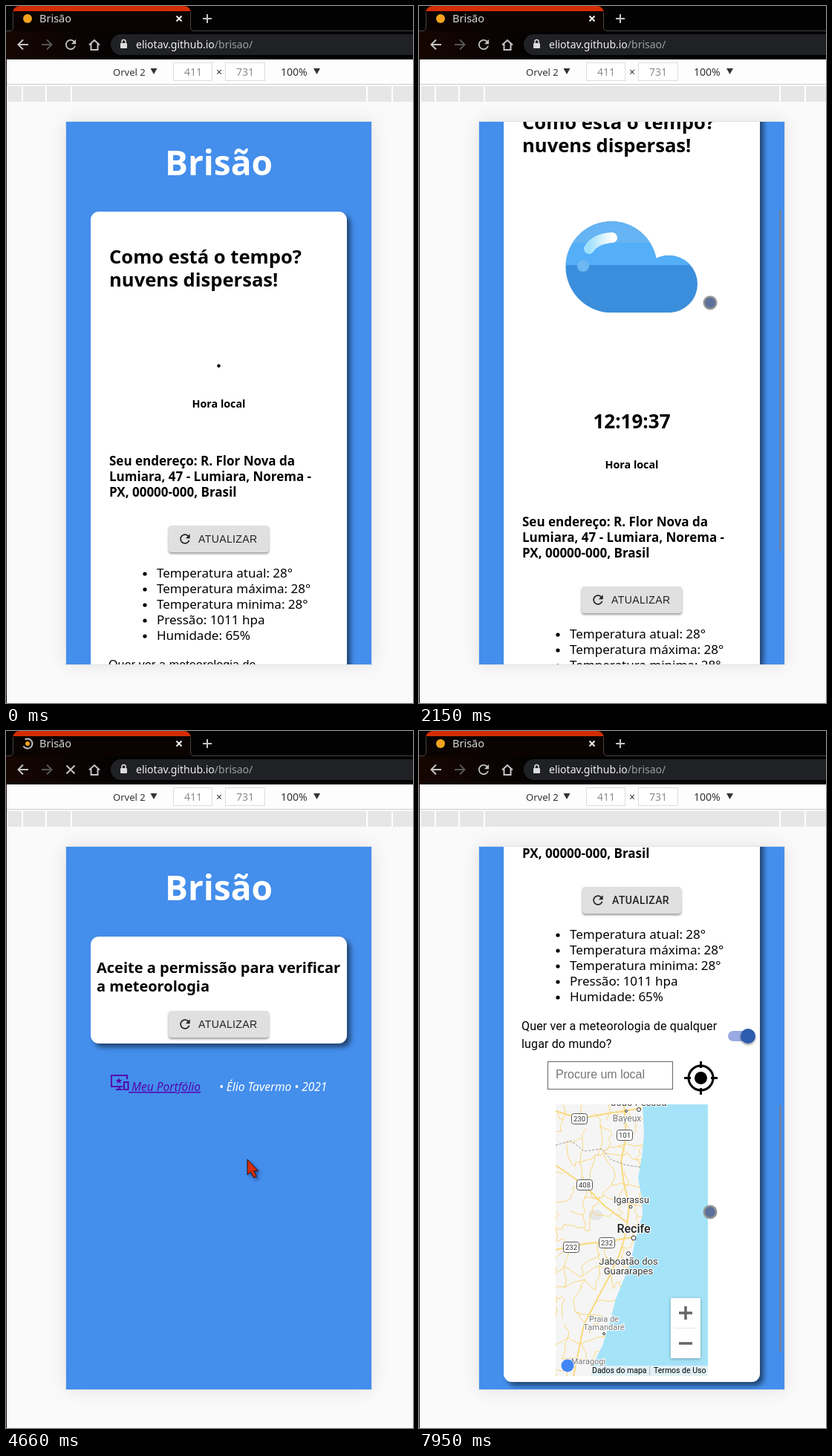
Animation of 548x939 px, one loop 8000 ms. Source, as an HTML page:

```html
<!DOCTYPE html>
<html lang="pt">
<head>
<meta charset="utf-8">
<title>Brisão</title>
<style>
  html, body { margin: 0; width: 100%; height: 100%; overflow: hidden; background: #fafafa; }
  svg { display: block; font-family: "Noto Sans", sans-serif; }
  text { white-space: pre; }
  .bold { font-weight: 700; }
  .mid { text-anchor: middle; }
  .arial { font-family: "Liberation Sans", sans-serif; }
  .roboto { font-family: Roboto, sans-serif; }
  .card { fill: #fff; filter: drop-shadow(5px 5px 3px rgba(0, 0, 0, .5)); }
  .raised { filter: drop-shadow(0 2px 1.5px rgba(0, 0, 0, .4)); }
  .line { fill: none; stroke: #c4c4c4; stroke-width: 2; }
</style>
</head>
<body>
<svg width="548" height="939" viewBox="0 0 548 939">
  <defs>
    <path id="refresh" d="M17.65 6.35C16.2 4.9 14.21 4 12 4c-4.42 0-8 3.58-8 8s3.58 8 8 8c3.73 0 6.84-2.55 7.73-6h-2.08c-.82 2.33-3.04 4-5.65 4-3.31 0-6-2.69-6-6s2.69-6 6-6c1.66 0 3.14.69 4.22 1.78L13 11h7V4z"/>
    <linearGradient id="bar"><stop stop-color="#160602"/><stop offset=".3" stop-color="#020202"/></linearGradient>
    <linearGradient id="shine"><stop stop-color="#9fe0fb"/><stop offset="1" stop-color="#fff"/></linearGradient>
    <clipPath id="tabShape"><rect x="9" width="240" height="50" rx="9"/></clipPath>
    <clipPath id="cloudShape">
      <circle cx="259" cy="544.5" r="61.5"/><circle cx="336.5" cy="567.5" r="38.5"/>
      <rect x="259" y="567" width="78" height="39"/>
    </clipPath>
    <clipPath id="mapShape"><rect x="184" y="503" width="205" height="366"/></clipPath>
  </defs>

  <!-- browser bar -->
  <rect width="548" height="72" fill="#020202"/>
  <rect y="33" width="548" height="39" fill="url(#bar)"/>
  <g clip-path="url(#tabShape)">
    <rect x="9" width="240" height="34" fill="#0a0302"/>
    <rect x="9" width="240" height="7" fill="#d42d03"/>
  </g>
  <path d="M0 33.500H5Q9.500 33.500 9.500 28V8M248.500 8V28Q248.500 33.500 253 33.500H548" fill="none" stroke="#4a4342"/>
  <circle id="favicon" cx="29" cy="17" r="6" fill="#f2a31f"/>
  <circle id="spinner" cx="29" cy="17" r="6.500" class="line" stroke-dasharray="30 11"/>
  <text x="45" y="22" font-size="14.500" fill="#d8d8d8">Brisão</text>
  <path d="M229.500 13.500l7 7m0-7l-7 7" class="line" style="stroke:#eee"/>
  <path d="M265 17h12m-6-6v12" class="line"/>
  <path d="M30 52H17m6-6.500L16.500 52l6.500 6.500" class="line"/>
  <path d="M48 52h13m-6-6.500L61.500 52 55 58.500" class="line" style="stroke:#555"/>
  <use id="reload" href="#refresh" transform="translate(76.500 41.500) scale(.88)" fill="#c4c4c4"/>
  <path id="stop" d="M81.500 46.500l11 11m0-11l-11 11" class="line"/>
  <path d="M112 52.500l7-6.500 7 6.500m-11.500-1.500v8h9v-8" class="line"/>
  <rect x="141" y="38" width="430" height="28" rx="14" fill="#202124"/>
  <rect x="154" y="50" width="9" height="7" rx="1" fill="#ddd"/>
  <path d="M156 50v-2a2.500 2.500 0 0 1 5 0v2" class="line" style="stroke:#ddd;stroke-width:1.5"/>
  <text x="175" y="57" font-size="14" fill="#f0f0f0">eliotav.github.io<tspan fill="#9aa0a6">/brisao/</tspan></text>

  <!-- device bar -->
  <rect y="72" width="548" height="33" fill="#fdfdfd"/>
  <path d="M0 105.500H548" stroke="#ccc"/>
  <g font-size="14" fill="#333">
    <text x="144" y="94" font-size="13">Orvel 2</text><path d="M194.500 84h9l-4.500 8z"/>
    <text x="370" y="94">100%</text><path d="M414 84h9l-4.500 8z"/>
    <text x="287" y="94" class="mid">×</text>
    <g fill="#fff" stroke="#ddd"><rect x="225.500" y="76.500" width="52" height="24"/><rect x="295.500" y="76.500" width="53" height="24"/></g>
    <text x="252" y="94" class="mid" fill="#8c8c8c">411</text><text x="322" y="94" class="mid" fill="#8c8c8c">731</text>
  </g>
  <rect x="3" y="108" width="545" height="21" fill="#e6e6e6"/>
  <path d="M22 108v21M54 108v21M88 108v21M486 108v21M520 108v21" stroke="#fff" stroke-width="2"/>
  <path d="M.5 72V939" stroke="#1a0a08"/>
  <rect x="81" y="156" width="411" height="731" fill="#448eec" style="filter:drop-shadow(0 0 12px rgba(0,0,0,.1))"/>
  <rect x="80.500" y="155.500" width="412" height="732" fill="none" stroke="#dde3ea"/>

  <svg x="81" y="156" width="411" height="731" viewBox="81 156 411 731">
    <rect x="81" y="156" width="411" height="731" fill="#448eec"/>
    <g id="page">
      <text x="286.500" y="228" class="bold mid" font-size="46" fill="#fff">Brisão</text>
      <rect id="card" class="card" x="114" y="277" width="345" height="144" rx="11"/>

      <g id="prompt" class="bold" font-size="20">
        <text x="122" y="326">Aceite a permissão para verificar</text><text x="122" y="351">a meteorologia</text>
      </g>

      <g id="weather">
        <g class="bold" font-size="25.600">
          <text x="139" y="347">Como está o tempo?</text><text x="139" y="378">nuvens dispersas!</text>
        </g>
        <g id="cloud">
          <g clip-path="url(#cloudShape)">
            <rect x="197" y="483" width="178" height="123" fill="#3a8edb"/>
            <rect x="197" y="483" width="178" height="59" fill="#54aef8"/>
            <rect x="197" y="483" width="178" height="29" fill="#66b4f3"/>
          </g>
          <path d="M229 520Q238 506 260 505" fill="none" stroke="url(#shine)" stroke-width="14" stroke-linecap="round"/>
          <circle cx="221" cy="543" r="8" fill="#6db8f2"/>
        </g>
        <g id="lower">
          <text id="clock" x="286.500" y="487" class="bold mid" font-size="26"></text>
          <text x="286.500" y="541" class="bold mid" font-size="14.300">Hora local</text>
          <g class="bold" font-size="17">
            <text x="139" y="619">Seu endereço: R. Flor Nova da</text>
            <text x="139" y="640">Lumiara, 47 - Lumiara, Norema -</text>
            <text x="139" y="661">PX, 00000-000, Brasil</text>
          </g>
          <g id="facts" font-size="17"></g>
          <g id="question" font-size="16"><text id="line1" x="138" y="893"></text><text id="line2" x="138" y="917"></text></g>
          <rect id="track" x="416" y="894" width="34" height="14" rx="7"/>
          <circle id="knob" cy="901" r="10" class="raised"/>

          <g id="search" transform="translate(0 490)">
            <rect x="173.500" y="445.500" width="168" height="37" fill="#fff" stroke="#666"/>
            <text x="184" y="468" class="arial" font-size="16" fill="#757575">Procure um local</text>
            <g stroke="#000" stroke-width="3"><circle cx="379.500" cy="467.500" r="16.500" fill="none"/><path d="M379.500 445v9m0 27v9M357 467.500h9m27 0h9"/></g>
            <circle cx="379.500" cy="467.500" r="8.500"/>
            <rect x="184" y="503" width="205" height="366" fill="#e5e3df"/>
            <g id="map" clip-path="url(#mapShape)">
              <rect x="184" y="503" width="205" height="366" fill="#f5f5f5"/>
              <ellipse cx="238" cy="652" rx="10" ry="7" fill="#e6e6e6"/>
              <g id="roads" fill="none" stroke="#fad97c"></g>
              <path d="M184 558L205 552 222 566 246 563 258 577 276 584 300 588" fill="none" stroke="#999" stroke-dasharray="3 2"/>
              <path d="M301 503L303 545 300 574 295 602 300 630 301 652 291 686 285 716 276 738 265 765 256 800 247 828 236 850 231 869H389V503z" fill="#a5e3f9"/>
              <g id="labels" class="roboto mid"></g>
              <circle cx="200" cy="855" r="8.500" fill="#4285f4"/>
              <rect x="230" y="855" width="159" height="14" fill="#f5f5f5" opacity=".75"/>
              <path d="M310.500 856v12" stroke="#bbb"/>
              <rect x="339" y="764" width="40" height="81" fill="#fff" style="filter:drop-shadow(0 1px 2px rgba(0,0,0,.3))"/>
              <path d="M344 804.500h30" stroke="#e6e6e6"/>
              <path d="M350 784h18m-9-9v18M350 825h18" stroke="#666" stroke-width="3.500"/>
              <g class="roboto" font-size="10.500"><text x="233" y="865">Dados do mapa</text><text x="316" y="865">Termos de Uso</text></g>
            </g>
          </g>
        </g>
      </g>

      <g id="button">
        <rect id="face" y="700" height="36" rx="4" fill="#e0e0e0" class="raised"/>
        <use href="#refresh" transform="translate(231 708) scale(.833)" fill="#222"/>
        <text id="buttonText" y="723" font-size="14" letter-spacing=".4" fill="#222">ATUALIZAR</text>
      </g>

      <g id="footer">
        <g fill="none" stroke="#5207ae" stroke-width="2">
          <path d="M157 479H142V464H163V469M148 483h9M152.500 479v4"/><rect x="159" y="473" width="5.500" height="10"/>
        </g>
        <path d="M152 467l1.200 3h3.300l-2.600 2 1 3.200-2.900-1.900-2.900 1.900 1-3.200-2.600-2h3.300z" fill="#5207ae"/>
        <g font-size="15.500" font-style="italic">
          <text x="165" y="485" fill="#5207ae" text-decoration="underline">&#160;Meu Portfólio</text>
          <text x="287" y="485" fill="#fff">• Élio Tavermo • 2021</text>
        </g>
      </g>
    </g>
    <rect id="scrollbar" x="485" width="3" rx="1.500" fill="#6d83a3"/>
    <g id="touch"><circle r="9.500" fill="#949494"/><circle r="7" fill="#5b709b"/></g>
    <path id="arrow" d="M325 577v21l4.500-4 4 8 4-2-4-7.500h6z" fill="#d62d0c" stroke="#201010" style="filter:drop-shadow(3px 3px 2px rgba(0,0,60,.4))"/>
  </svg>
</svg>
<script>
const DURATION = 8000;
const IMAGE_SHIFT = 263, MAP_SHIFT = 433, VIEW = 731, SCROLL_TRACK = 717;
const CLICK = 3950, UNLOAD = 4400, LOADED = 4900, DATA = 5150, IMAGE = 5300, TOGGLE = 6590;
const ui = Object.fromEntries([...document.querySelectorAll('[id]')].map(e => [e.id, e]));

// Keys are [time, value, ...]; equal times make a hard jump.
const scrollKeys = [[1560, 0], [1660, 31], [2150, 181], [2330, 236], [2700, 236], [3060, 311], [3330, 408],
  [UNLOAD, 408], [UNLOAD, 0], [DATA, 0], [DATA, 145], [IMAGE, 145], [IMAGE, 408],
  [7420, 408], [7700, 600], [7950, 753], [8000, 775]];
const touchKeys = [[500, 330, 900], [900, 362, 710], [1400, 380, 582], [1560, 380, 582], [1660, 381, 551],
  [2150, 392, 400], [2330, 396, 345], [2700, 405, 542], [3060, 407, 467], [3330, 408, 370], [3850, 325, 577],
  [DATA, 325, 577], [5650, 398, 484], [5800, 401, 476], [5950, 401, 480], [6450, 432, 757], [6700, 432, 757],
  [7380, 400, 840], [7800, 392, 648]];
const barKeys = [[1540, 0], [1600, 1], [3600, 1], [3850, 0], [DATA, 0], [DATA, 1], [6200, 1], [6450, 0], [7400, 0], [7450, 1]];

function sample(keys, t) {
  const next = keys.findIndex(k => k[0] > t);
  if (next < 0) return keys.at(-1).slice(1);
  if (next === 0) return keys[0].slice(1);
  const a = keys[next - 1], b = keys[next], p = (t - a[0]) / (b[0] - a[0]);
  return a.slice(1).map((v, i) => v + (b[i + 1] - v) * p);
}
const show = (el, on) => el.style.display = on ? '' : 'none';
const move = (el, x, y) => el.setAttribute('transform', `translate(${x} ${y})`);
const set = (el, attrs) => Object.entries(attrs).forEach(([k, v]) => el.setAttribute(k, v));

ui.facts.innerHTML = ['Temperatura atual: 28°', 'Temperatura máxima: 28°', 'Temperatura minima: 28°', 'Pressão: 1011 hpa', 'Humidade: 65%']
  .map((s, i) => `<circle cx="187" cy="${765 + 21 * i}" r="2.600"/><text x="203" y="${770 + 21 * i}">${s}</text>`).join('');

// Roads join the nodes of an irregular grid.
let seed = 11;
const random = () => (seed = seed * 16807 % 2147483647) / 2147483647;
const jitter = size => (random() - .5) * size;
const CELL = 19;
const nodes = Array.from({ length: 21 }, (_, row) => Array.from({ length: 8 }, (_, col) =>
  [180 + col * CELL + jitter(17), 500 + row * CELL + jitter(17)]));
function road([x1, y1], [x2, y2]) {
  const bend = [1, 2].map(i => [x1 + (x2 - x1) * i / 3 + jitter(7), y1 + (y2 - y1) * i / 3 + jitter(7)]);
  return `M${x1} ${y1}L${bend} ${x2} ${y2}`;
}
let lanes = '';
nodes.forEach((line, row) => line.forEach((node, col) => {
  if (col < 7 && random() < .62) lanes += road(node, line[col + 1]);
  if (row < 20 && random() < .62) lanes += road(node, nodes[row + 1][col]);
}));
ui.roads.innerHTML = `<path d="${lanes}"/>` +
  '<path d="M276 503L279 545 272 580 276 610 283 640 279 675 270 705 256 735 240 765 222 800 208 869M184 699L205 694 230 690 253 688 288 682M184 585L223 612 250 640 280 662M184 512L216 522 250 516 300 508" stroke-width="2"/>';

const label = (s, x, y, size, fill = '#333', weight = 400) =>
  `<text x="${x}" y="${y}" font-size="${size}" font-weight="${weight}" fill="${fill}" stroke="#fff" stroke-width="2" paint-order="stroke">${s}</text>`;
const shield = (s, x, y) => `<rect x="${x - 10.5}" y="${y - 7.5}" width="21" height="14" rx="3" fill="#fff" stroke="#555"/>
  <text x="${x}" y="${y + 3}" font-size="9.500" fill="#333">${s}</text>`;
const town = (x, y, r = 2.5) => `<circle cx="${x}" cy="${y}" r="${r}" fill="#fff" stroke="#333"/>`;
ui.labels.innerHTML =
  label('João Pessoa', 296, 505, 13) + label('Bayeux', 280, 526, 12, '#777') + label('Igarassu', 286, 636, 12.5) +
  label('Recife', 289, 676, 16, '#222', 500) + label('Jaboatão dos', 282, 719, 13) + label('Guararapes', 282, 732, 13) +
  label('Praia de', 249, 796, 11, '#777') + label('Tamandaré', 249, 807, 11, '#777') + label('Maragogi', 228, 853, 11, '#777') +
  town(296, 510) + town(279, 512, 1.5) + town(285, 641, 2) + town(289, 683, 3) + town(282, 704) + town(249, 812, 1.5) +
  shield(230, 216, 523) + shield(101, 277, 545) + shield(408, 223, 612) + shield(232, 205, 696) + shield(232, 253, 690);

function draw(t) {
  const waiting = t >= UNLOAD && t < DATA;
  const hasImage = t >= 140 && t < UNLOAD || t >= IMAGE;
  const hasMap = t >= TOGGLE + 60;
  const newFont = t >= 6900;
  const loading = t >= CLICK && t < LOADED;
  const shift = hasImage ? IMAGE_SHIFT : 0;
  const bottom = waiting ? 421 : 934 + shift + (hasMap ? MAP_SHIFT : 0);
  const [scroll] = sample(scrollKeys, t);

  show(ui.spinner, loading);
  show(ui.stop, loading);
  show(ui.reload, !loading);
  ui.favicon.setAttribute('r', loading ? 3 : 6);
  ui.spinner.setAttribute('transform', `rotate(${t * .36} 29 17)`);

  move(ui.page, 0, -Math.round(scroll));
  show(ui.prompt, waiting);
  show(ui.weather, !waiting);
  ui.card.setAttribute('height', bottom - 277);
  move(ui.footer, 0, bottom - 421);
  move(ui.lower, 0, shift);
  move(ui.button, 0, waiting ? -323 : shift);

  show(ui.cloud, hasImage);
  move(ui.cloud, 0, -7.5 * (1 - Math.cos((t - 1660) / 1400 * 2 * Math.PI)));
  ui.clock.textContent = hasImage ? `12:19:${36 + Math.floor((t - 730) / 1000)}` : '.';

  set(ui.face, newFont ? { x: 220, width: 133 } : { x: 219, width: 135 });
  set(ui.buttonText, { x: newFont ? 260 : 259, class: newFont ? 'roboto' : 'arial', 'font-weight': newFont ? 500 : 400 });
  set(ui.question, { class: newFont ? 'roboto' : 'arial', 'letter-spacing': .15 });
  ui.line1.textContent = newFont ? 'Quer ver a meteorologia de qualquer' : 'Quer ver a meteorologia de';
  ui.line2.textContent = newFont ? 'lugar do mundo?' : 'qualquer lugar do mundo?';

  const on = Math.min(1, Math.max(0, (t - TOGGLE) / 150));
  set(ui.knob, { cx: 423 + 20 * on, fill: on > .5 ? '#2b5cae' : '#fafafa' });
  ui.track.setAttribute('fill', on > .5 ? '#9aaae2' : '#9a9a9a');
  show(ui.search, hasMap);
  show(ui.map, t >= 7000);

  const pageHeight = 876 + shift + (hasMap ? MAP_SHIFT : 0);
  set(ui.scrollbar, {
    y: 160 + SCROLL_TRACK * scroll / pageHeight,
    height: SCROLL_TRACK * VIEW / pageHeight,
    opacity: sample(barKeys, t)[0]
  });
  show(ui.touch, !waiting);
  show(ui.arrow, waiting);
  move(ui.touch, ...sample(touchKeys, t));
}

function tick() {
  draw(performance.now() % DURATION);
  requestAnimationFrame(tick);
}
tick();
</script>
</body>
</html>
```
